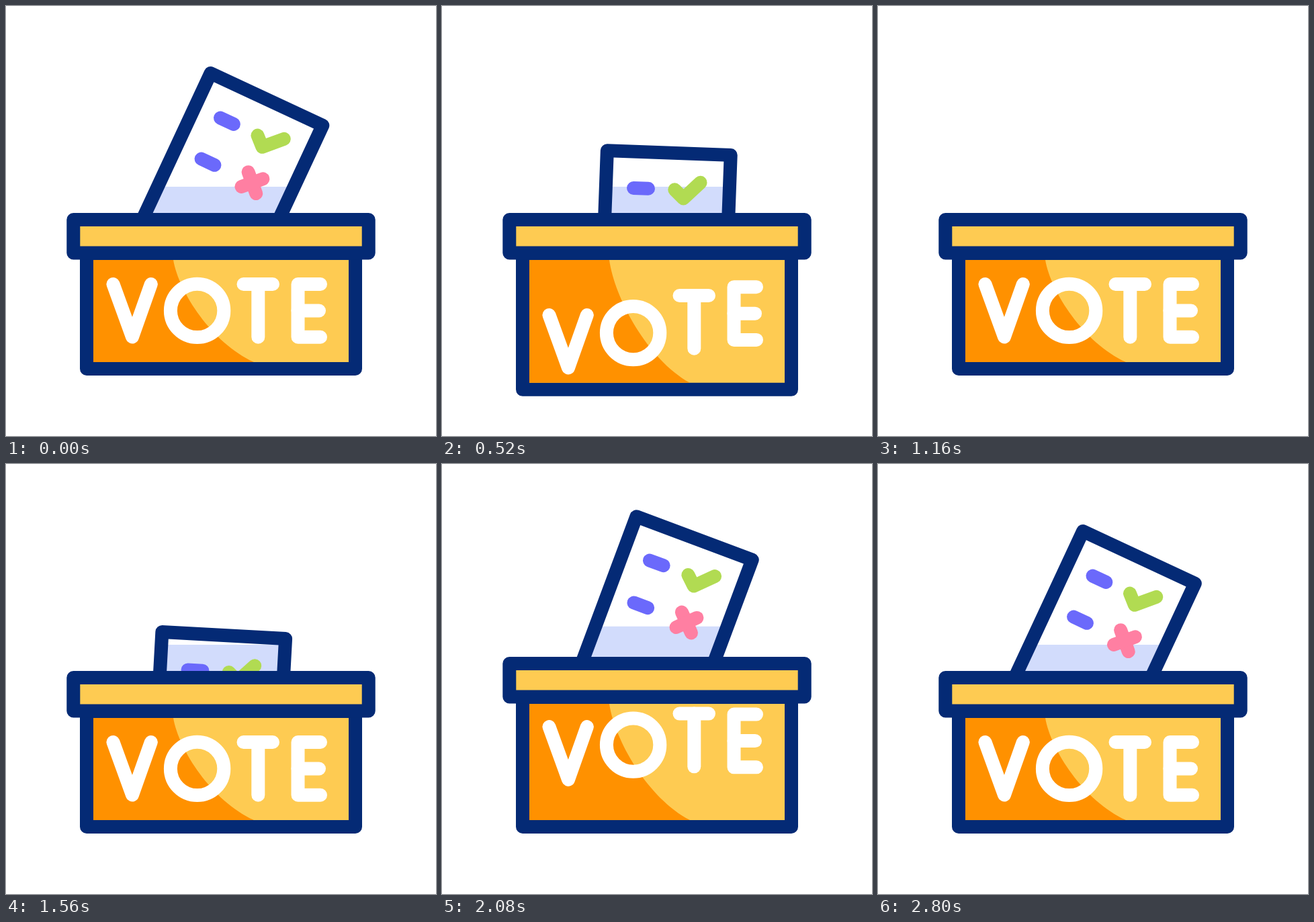
These frames come from a looping animation (640x640 px, 3000 ms). An HTML page with a canvas:

```html
<!DOCTYPE html>
<html lang="en">
<head>
<meta charset="utf-8">
<title>Vote</title>
<style>
html, body { margin: 0; width: 100%; height: 100%; overflow: hidden; background: #fff; }
canvas { display: block; width: 640px; height: 640px; }
</style>
</head>
<body>
<canvas id="stage" width="640" height="640"></canvas>
<script>
const ctx = document.getElementById('stage').getContext('2d');
const LOOP = 3000, STEP = 40, LAST = 2800;
const NAVY = '#042a75', YELLOW = '#fecb52', ORANGE = '#ff9100';
const PURPLE = '#6b69fb', GREEN = '#b1db52', PINK = '#ff7fa2', SHADE = '#d2dcfc';

const sine = p => (1 - Math.cos(Math.PI * p)) / 2;
const cubicOut = p => 1 - (1 - p) ** 3;

// Keys are [time, value, easing into this key].
function track(t, ...keys) {
  if (t <= keys[0][0]) return keys[0][1];
  for (let i = 1; i < keys.length; i++) {
    const [t0, v0] = keys[i - 1], [t1, v1, ease = sine] = keys[i];
    if (t < t1) return v0 + (v1 - v0) * ease((t - t0) / (t1 - t0));
  }
  return keys[keys.length - 1][1];
}

function line(color, ...points) {
  ctx.beginPath();
  points.forEach(([x, y]) => ctx.lineTo(x, y));
  ctx.strokeStyle = color;
  ctx.stroke();
}

function box(x, y, w, h, fill) {
  ctx.fillStyle = fill;
  ctx.fillRect(x, y, w, h);
  ctx.strokeStyle = NAVY;
  ctx.strokeRect(x, y, w, h);
}

function drawPaper(t, lid) {
  const x = t < 1000 ? 333 : track(t, [1520, 317], [2320, 333.5]);
  const y = track(t, [0, 256.7], [260, 216], [780, 481], [1484, 481],
    [2000, 228, cubicOut], [2320, 256.7]);
  const angle = track(t, [0, 25], [640, 0], [1000, 3], [1520, 3], [2320, 25]);

  ctx.save();
  ctx.beginPath();
  ctx.rect(0, 0, 640, 340 + lid);
  ctx.clip();
  ctx.translate(x, y);
  ctx.rotate(angle * Math.PI / 180);
  ctx.translate(-92, -130);

  ctx.save();
  ctx.beginPath();
  ctx.rect(0, 0, 184, 300);
  ctx.fillStyle = '#fff';
  ctx.fill();
  ctx.clip();
  ctx.resetTransform();
  ctx.fillStyle = SHADE;
  ctx.fillRect(0, 269 + lid * 1.3, 640, 200);
  ctx.restore();

  line(PURPLE, [41.2, 54.3], [63.2, 54.3]);
  line(PURPLE, [41.2, 121.5], [63.2, 121.5]);
  line(GREEN, [102.5, 54.4], [116, 67], [140.4, 42.5]);
  line(PINK, [113, 109.7], [137, 133.7]);
  line(PINK, [137, 109.7], [113, 133.7]);
  ctx.strokeStyle = NAVY;
  ctx.strokeRect(0, 0, 184, 300);
  ctx.restore();
}

function drawBody(t, lid) {
  const top = 368 + lid, bottom = 540 + track(t, [302, 0], [702, 54], [1104, 0]);
  const inner = top + 10, depth = bottom - 10 - inner;
  box(120, top, 400, bottom - top, YELLOW);
  ctx.beginPath();
  ctx.moveTo(130, inner);
  ctx.lineTo(249, inner);
  ctx.bezierCurveTo(257, inner + depth * 0.31, 306, inner + depth * 0.81, 369, inner + depth);
  ctx.lineTo(130, inner + depth);
  ctx.fillStyle = ORANGE;
  ctx.fill();
}

const white = (...points) => line('#fff', ...points);
const letters = [
  () => white([159.5, 414], [188, 492.5], [215.8, 414]),
  () => {
    ctx.beginPath();
    ctx.arc(284.6, 453.4, 39.7, 0, 2 * Math.PI);
    ctx.strokeStyle = '#fff';
    ctx.stroke();
  },
  () => {
    white([353.5, 414], [397, 414]);
    white([375.3, 414], [375.3, 492.7]);
  },
  () => {
    white([468, 414], [434.5, 414], [434.5, 492.7], [468, 492.7]);
    white([434.5, 453.5], [466, 453.5]);
  }
];

function drawLetters(t) {
  letters.forEach((draw, i) => {
    const local = t - i * 63;
    ctx.save();
    ctx.translate(0, track(local, [275, 0], [575, 50], [931, 0],
      [1615, 0], [1930, -43], [2243, 0]));
    draw();
    ctx.restore();
  });
}

function render(now) {
  const t = Math.min(LAST, Math.floor((now % LOOP) / STEP) * STEP);
  const lid = track(t, [1640, 0], [2020, -23], [2400, 10.5], [2760, 0]);
  ctx.fillStyle = '#fff';
  ctx.fillRect(0, 0, 640, 640);
  ctx.lineWidth = 20;
  ctx.lineCap = ctx.lineJoin = 'round';
  drawPaper(t, lid);
  drawBody(t, lid);
  box(100.3, 318 + lid, 439.4, 49.5, YELLOW);
  drawLetters(t);
}

const start = performance.now();
function loop() {
  render(performance.now() - start);
  requestAnimationFrame(loop);
}
loop();
</script>
</body>
</html>
```
